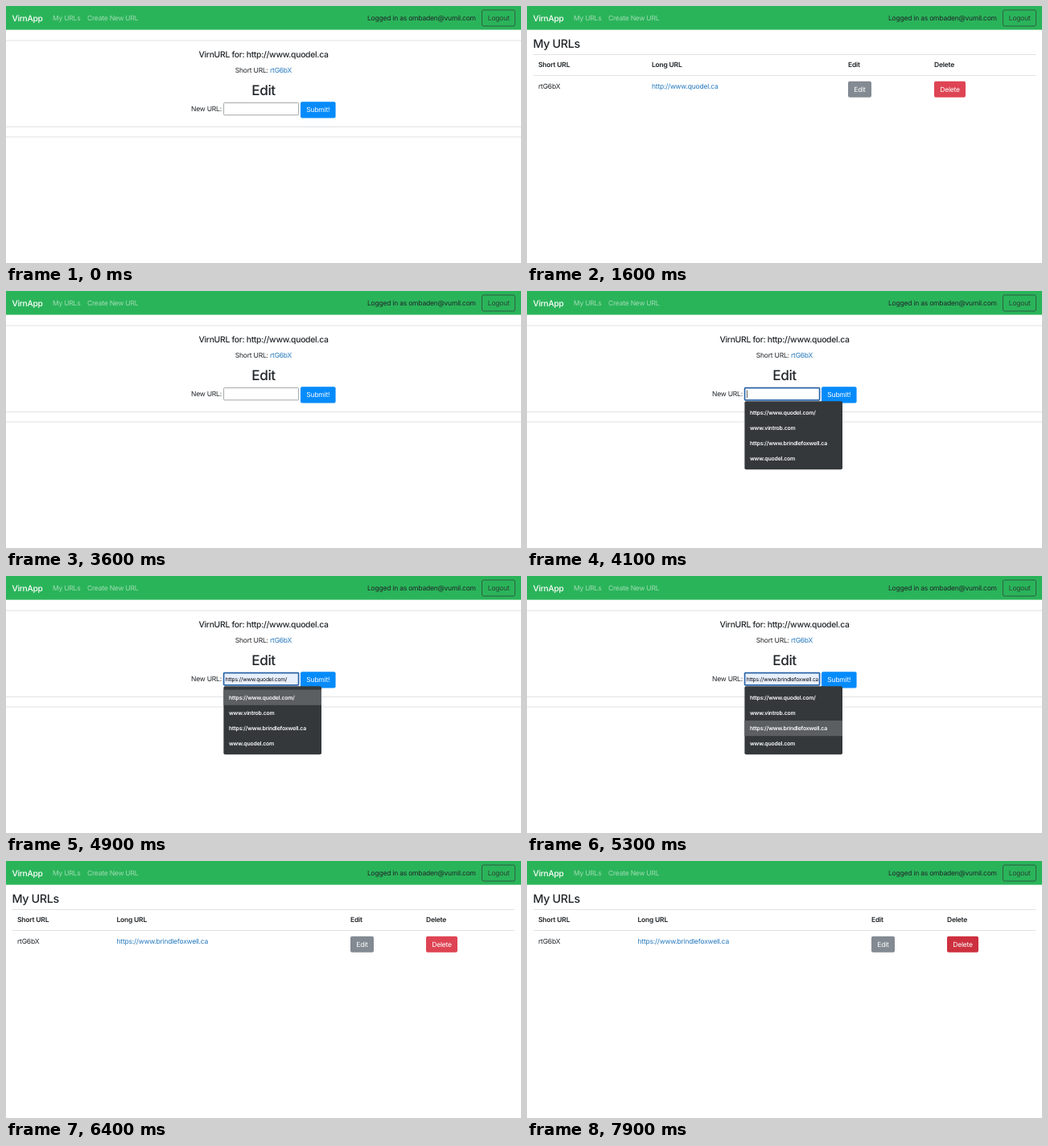
These frames come from a looping animation (640 by 320 pixels, 8000 ms). An HTML page:

```html
<!DOCTYPE html>
<html lang="en">
<head>
<meta charset="utf-8">
<title>Short links</title>
<style>
  html, body { margin: 0; width: 100%; height: 100%; overflow: hidden; background: #fff; }
  svg { display: block; width: 100vw; height: 100vh; }
  text {
    font: 400 8.5px Inter, Roboto, sans-serif;
    letter-spacing: -.025em;
    fill: #212529;
    text-rendering: geometricPrecision;
    white-space: pre;
  }
  .brand { font-size: 10.2px; font-weight: 500; fill: #fff; }
  .nav { fill: #a0dcb3; }
  .link { fill: #2478bd; }
  .label { fill: #fff; }
  .bold { font-weight: 600; }
  .h2 { font-size: 17.2px; font-weight: 500; }
  .h3 { font-size: 14.3px; font-weight: 500; }
  .h5 { font-size: 10.4px; font-weight: 500; letter-spacing: -.03em; }
  .option { font-size: 6.9px; font-weight: 600; fill: #fff; }
  .middle { text-anchor: middle; }
  .rule { fill: none; stroke: #dfe2e5; }
</style>
</head>
<body>
<svg viewBox="0 0 640 320">
  <defs><clipPath id="fieldClip"><path d="M272 121h89.7v15h-89.7z"/></clipPath></defs>
  <rect width="640" height="29.6" fill="#2ab45a"/>
  <text class="brand" x="7.5" y="18.6">VirnApp</text>
  <text class="nav" x="58" y="18.2">My URLs</text>
  <text class="nav" x="101" y="18.2">Create New URL</text>
  <text x="449" y="18.2">Logged in as ombaden@vumil.com</text>
  <rect x="591.5" y="5" width="41" height="20" rx="2" fill="none" stroke="#2f4b3a" stroke-width=".8"/>
  <text class="middle" x="612.2" y="18.2" style="fill:#2b4334">Logout</text>

  <g id="listPage">
    <text class="h3" x="7.5" y="52.2">My URLs</text>
    <path class="rule" d="M8 60.5h624M8 86.5h624"/>
    <text class="bold" x="14" y="76.4">Short URL</text>
    <text x="14" y="103.2">rtG6bX</text>
    <g id="columns"></g>
  </g>

  <g id="editPage">
    <path class="rule" d="M0 43h640M0 150.5h640M0 163h640"/>
    <text class="h5 middle" x="320" y="64.2">VirnURL for: http://www.quodel.ca</text>
    <text class="middle" x="320" y="83">Short URL: <tspan class="link">rtG6bX</tspan></text>
    <text class="h2 middle" x="320" y="111.3">Edit</text>
    <text x="230" y="131.4">New URL:</text>
    <rect id="field" x="270.6" y="120.6" width="93" height="15.2" rx="1"/>
    <text id="value" x="272.8" y="130.9" clip-path="url(#fieldClip)" style="fill:#000"></text>
    <path id="caret" d="M273.5 123.5v9.5" stroke="#222" stroke-width=".7"/>
    <rect id="submit" x="366" y="119.2" width="43.6" height="20.2" rx="2"/>
    <text class="label middle" x="387.8" y="132.2">Submit!</text>
    <g id="menu">
      <rect x="270.4" y="137.2" width="121.6" height="85" rx="2" fill="#34383b"/>
      <rect id="highlight" x="270.4" width="121.6" height="19.2" fill="#5b5f62"/>
    </g>
  </g>
</svg>
<script>
const DURATION = 8000;
const OPTIONS = ['https://www.quodel.com/', 'www.vintrob.com', 'https://www.brindlefoxwell.ca', 'www.quodel.com'];
const GREY = [[131, 138, 146], [110, 118, 126]];
const RED = [[222, 68, 83], [205, 48, 62]];
const BLUE = [[6, 139, 251], [0, 120, 226]];

// Moments of the user's actions, in ms
const LIST_OPEN = 1500, EDIT_HOVER = 2400, EDIT_OPEN = 3300, FOCUS = 3900;
const HOVERS = [4700, 5000, 5150], PICK = 5500;
const SUBMIT_HOVER = 6050, SAVED = 6400, DELETE_HOVER = 7700;

const $ = id => document.getElementById(id);
const show = (id, on) => { $(id).style.display = on ? '' : 'none'; };
const optionY = i => 141.6 + i * 19.2;

function hoverColor([from, to], elapsed) {
  const p = Math.min(1, Math.max(0, elapsed / 150));
  const eased = p * p * (3 - 2 * p);
  return `rgb(${from.map((c, i) => Math.round(c + (to[i] - c) * eased))})`;
}

const button = (x, width, label, color) =>
  `<rect x="${x}" y="93.8" width="${width}" height="20" rx="2" fill="${color}"/>
   <text class="label middle" x="${x + width / 2}" y="106.8">${label}</text>`;

function columns(t) {
  const saved = t >= SAVED;
  const [urlX, editX, deleteX] = saved ? [137.5, 428, 522] : [155, 399, 506];
  const heading = (x, label) => `<text class="bold" x="${x}" y="76.4">${label}</text>`;
  return heading(urlX, 'Long URL') + heading(editX, 'Edit') + heading(deleteX, 'Delete') +
    `<text class="link" x="${urlX}" y="103.2">${saved ? OPTIONS[2] : 'http://www.quodel.ca'}</text>` +
    button(editX, 29, 'Edit', hoverColor(GREY, saved ? 0 : t - EDIT_HOVER)) +
    button(deleteX, 39, 'Delete', hoverColor(RED, t - DELETE_HOVER));
}

function drawForm(t) {
  const focused = t >= FOCUS;
  const picked = t >= PICK;
  const hovered = HOVERS.filter(time => t >= time).length - 1;
  const filled = hovered >= 0;

  $('field').setAttribute('fill', filled ? '#e8f0fe' : '#fff');
  $('field').setAttribute('stroke', focused ? '#2b65a8' : '#8c8f92');
  $('field').setAttribute('stroke-width', focused ? 1.7 : .8);
  $('value').textContent = filled ? OPTIONS[hovered] : '';
  $('value').style.fontSize = picked ? '7.15px' : '6.7px';
  $('submit').setAttribute('fill', hoverColor(BLUE, t - SUBMIT_HOVER));
  $('highlight').setAttribute('y', optionY(Math.max(0, hovered)));
  show('highlight', filled);
  show('caret', focused && !filled && (t - FOCUS) % 1000 < 500);
  show('menu', focused && !picked);
}

function draw(t) {
  const listing = t >= SAVED || (t >= LIST_OPEN && t < EDIT_OPEN);
  show('listPage', listing);
  show('editPage', !listing);
  if (listing) $('columns').innerHTML = columns(t);
  else drawForm(t);
}

$('menu').insertAdjacentHTML('beforeend', OPTIONS.map((option, i) =>
  `<text class="option" x="277" y="${optionY(i) + 12}">${option}</text>`).join(''));

const start = performance.now();
function tick() {
  draw((performance.now() - start) % DURATION);
  requestAnimationFrame(tick);
}
tick();
</script>
</body>
</html>
```
